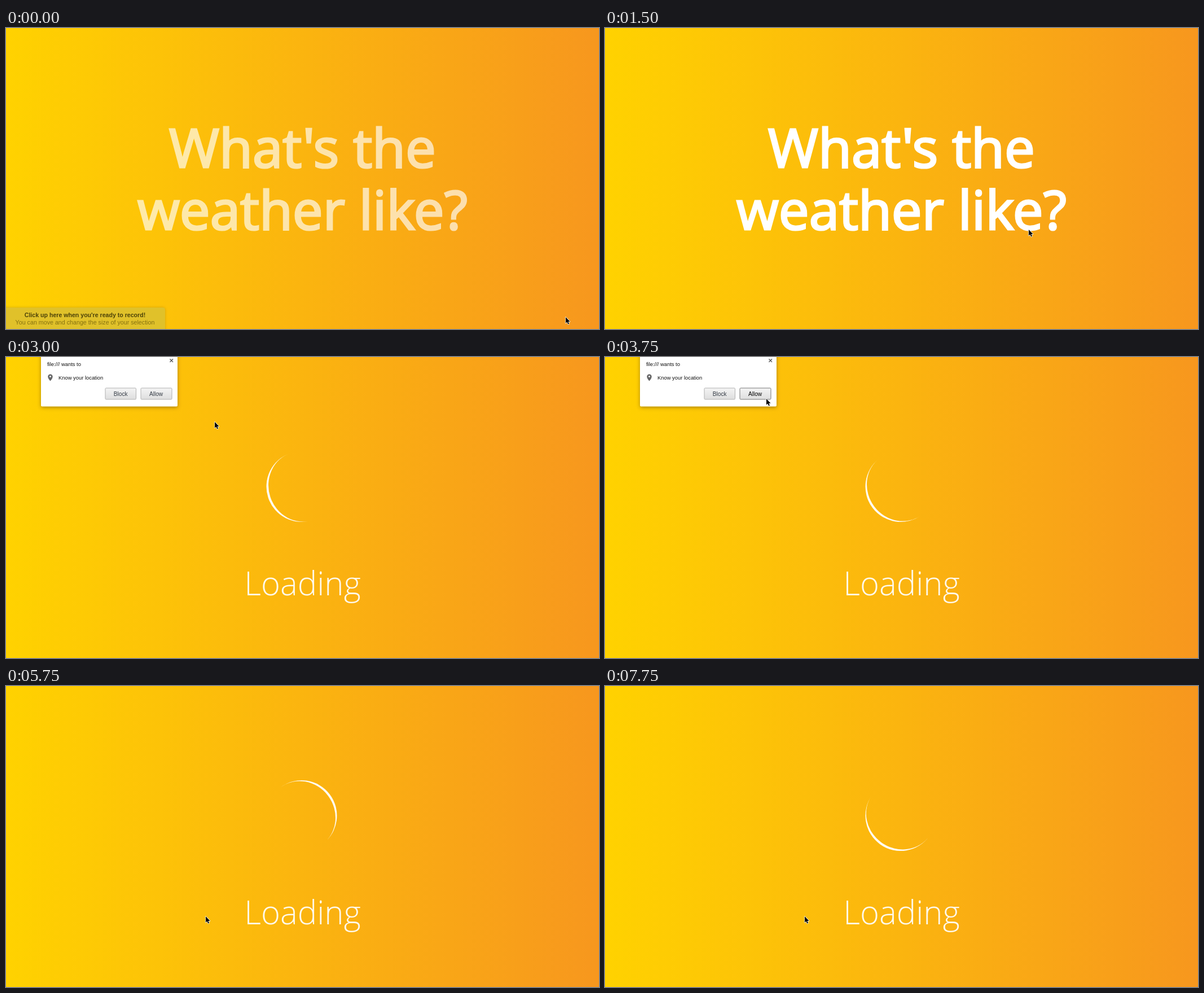
Recreate the animation shown at these times as an HTML page. Size 1051 by 533 pixels, loop 8000 ms.

```html
<!DOCTYPE html>
<html lang="en">
<head>
<meta charset="utf-8">
<title>Weather prompt</title>
<style>
  html, body { margin: 0; width: 100%; height: 100%; overflow: hidden; background: #fbb40f; }
  svg { display: block; width: 100%; height: 100%; }
  text { cursor: default; user-select: none; }
  .headline { font: 400 96px "Open Sans", sans-serif; fill: #fff; stroke: #fff; stroke-width: 3.2; text-anchor: middle; }
  .loading { font: 300 58px "Open Sans", sans-serif; fill: #fff; text-anchor: middle; opacity: .92; }
  .ui { font-family: "Liberation Sans", Arial, sans-serif; }
  .mid { text-anchor: middle; }
</style>
</head>
<body>
<svg viewBox="0 0 1051 533" preserveAspectRatio="none">
  <defs>
    <linearGradient id="sky">
      <stop offset="0" stop-color="#ffd200"/>
      <stop offset="1" stop-color="#f7971e"/>
    </linearGradient>
    <linearGradient id="face" x2="0" y2="1">
      <stop offset="0" stop-color="#f4f4f4"/>
      <stop offset="1" stop-color="#dedede"/>
    </linearGradient>
    <filter id="shadow" x="-10%" y="-20%" width="120%" height="150%">
      <feDropShadow dx="0" dy="2" stdDeviation="3" flood-color="#5a3c00" flood-opacity=".5"/>
    </filter>
    <filter id="glow" x="-10%" y="-30%" width="120%" height="160%">
      <feDropShadow dx="0" dy="0" stdDeviation="2" flood-color="#806000" flood-opacity=".35"/>
    </filter>
  </defs>

  <rect width="1051" height="533" fill="url(#sky)"/>

  <g id="headline" class="headline">
    <text x="525.5" y="246.5">What's the</text>
    <text x="525.5" y="356.5">weather like?</text>
  </g>

  <g id="hint" class="ui mid">
    <path d="M-8 495H278a4 4 0 0 1 4 4V545H-8Z" fill="#e0c129" filter="url(#glow)"/>
    <text x="140" y="512" font-size="10.6" font-weight="700" fill="#4c4208">Click up here when you're ready to record!</text>
    <text x="140" y="525" font-size="10.7" fill="#85710f">You can move and change the size of your selection</text>
  </g>

  <g id="loader">
    <path id="arc" d="M0-62.5A62.5 62.5 0 0 0 0 62.5A58.5 62.5 0 0 1 0-62.5Z" fill="#fff" fill-opacity=".95"/>
    <text class="loading" x="525.5" y="421.5">Loading</text>
  </g>

  <g id="dialog" class="ui">
    <path d="M62-8H304V85.500a2 2 0 0 1-2 2H64a2 2 0 0 1-2-2Z" fill="#fff" filter="url(#shadow)"/>
    <g font-size="9.4" fill="#111">
      <text x="73" y="16">file:/// wants to</text>
      <text x="93" y="39.500">Know your location</text>
    </g>
    <path d="M290.500 3.500l5.500 5.500m0-5.500l-5.500 5.500" stroke="#555" stroke-width="1.4"/>
    <path d="M78.500 42.500C76 39.500 74.300 37 74.300 34.700a4.200 4.200 0 0 1 8.400 0C82.700 37 81 39.500 78.500 42.500Z" fill="#666"/>
    <circle cx="78.500" cy="34.600" r="1.500" fill="#fff"/>
    <g class="mid" font-size="10.1" fill="#333a44">
      <rect x="176" y="55" width="54.500" height="20" rx="1.500" fill="url(#face)" stroke="#b0b0b0"/>
      <text x="203.200" y="68.500">Block</text>
      <g id="allow">
        <rect id="allowBox" x="239" y="55" width="55" height="20" rx="1.500" fill="url(#face)" stroke="#b0b0b0"/>
        <text x="266" y="68.500">Allow</text>
      </g>
    </g>
  </g>

  <path id="cursor" d="M0 0V10.800L2.400 8.600L4.200 12.600L6 11.800L4.300 8H7.600Z"
    fill="#000" stroke="#fff" stroke-width="1.300" stroke-linejoin="round" paint-order="stroke"/>
</svg>
<script>
const LOOP = 8000, STEP = 250;
const START_LOADING = 2250, HOVER_ALLOW = 3500, CLOSE_DIALOG = 4250;

// Keys: [time, value, value, ...]
const pointer = [
  [750, 992, 512], [1000, 880, 452], [1250, 785, 401], [1500, 751, 357],
  [2250, 751, 357], [2500, 670, 300], [3000, 370, 115], [3250, 292, 78], [3500, 286, 74],
  [4500, 286, 74], [4750, 332, 345], [5000, 354, 408]
];
const glow = [[1000, 0.65], [1500, 1]];
const turn = [[2250, 0], [3750, 683], [4750, 1133], [6750, 2033], [7750, 2465.5]];

const el = id => document.getElementById(id);
const show = (id, on) => el(id).setAttribute("display", on ? "inline" : "none");

function sample(keys, t) {
  const next = keys.findIndex(k => k[0] > t);
  if (next === 0) return keys[0].slice(1);
  if (next < 0) return keys[keys.length - 1].slice(1);
  const a = keys[next - 1], b = keys[next];
  const p = (t - a[0]) / (b[0] - a[0]);
  return a.slice(1).map((v, i) => v + (b[i + 1] - v) * p);
}

function draw(now) {
  const t = Math.floor((now % LOOP) / STEP) * STEP;
  const loading = t >= START_LOADING;
  const hover = t >= HOVER_ALLOW;

  show("hint", t < STEP);
  show("headline", !loading);
  show("loader", loading);
  show("dialog", loading && t < CLOSE_DIALOG);

  el("headline").setAttribute("opacity", sample(glow, t)[0]);
  el("arc").setAttribute("transform", `translate(524 229.5) rotate(${sample(turn, t)[0]})`);
  el("allow").setAttribute("fill", hover ? "#000" : "#333a44");
  el("allowBox").setAttribute("stroke", hover ? "#777" : "#b0b0b0");
  el("cursor").setAttribute("transform", `translate(${sample(pointer, t)})`);
}

const begin = performance.now();
function tick() {
  draw(performance.now() - begin);
  requestAnimationFrame(tick);
}
tick();
</script>
</body>
</html>
```
